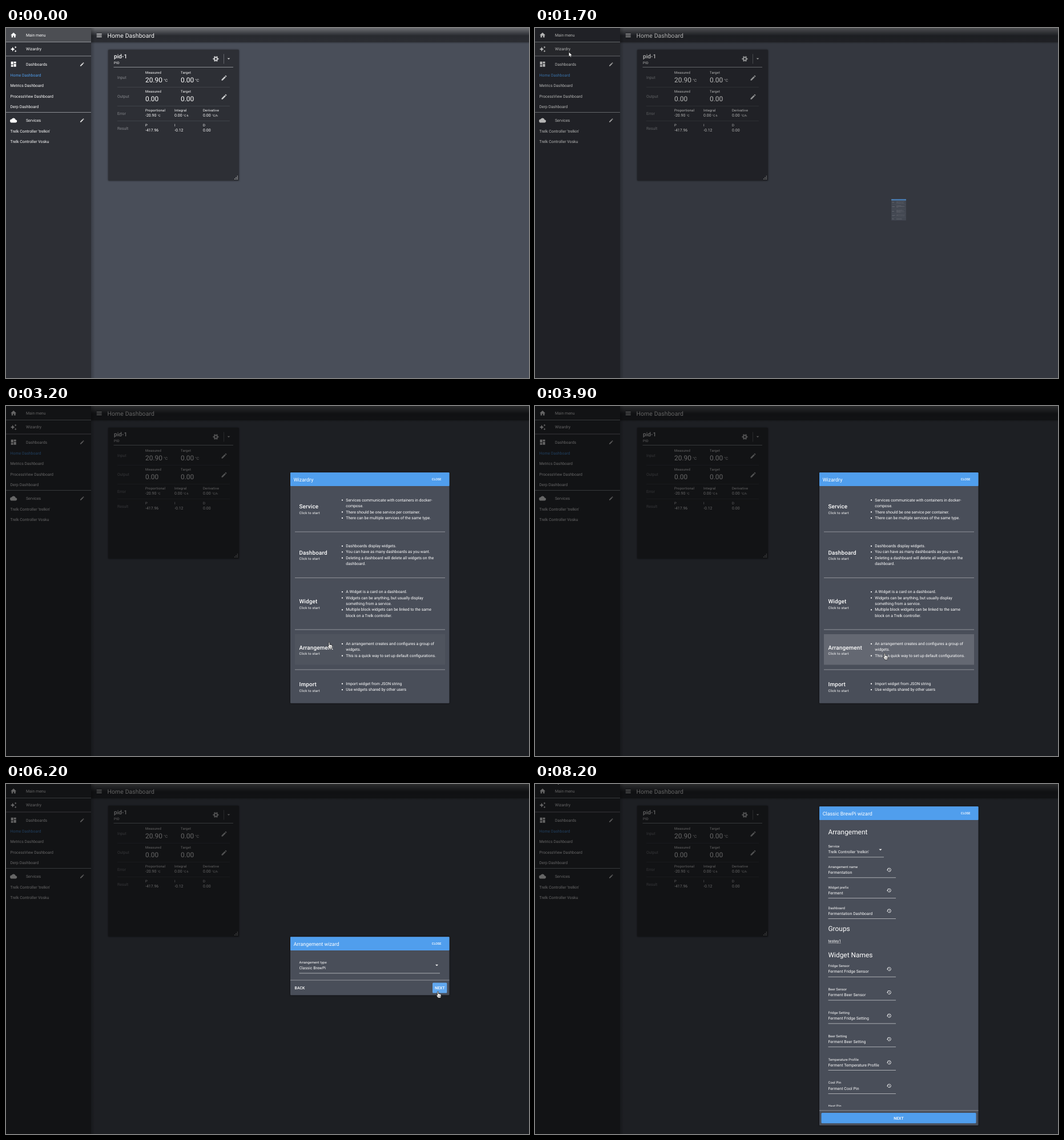
Animation of 916x612 px, one loop 8.7 s. Source, as an HTML page:

```html
<!DOCTYPE html>
<html lang="en">
<head>
<meta charset="utf-8">
<title>Dashboard wizard</title>
<style>
  html, body { margin: 0; width: 100%; height: 100%; overflow: hidden; background: #494e59; }
  svg { display: block; width: 916px; height: 612px; }
  text { font-family: Roboto, sans-serif; fill: #fff; text-rendering: geometricPrecision; white-space: pre; }
  .card { filter: drop-shadow(0 .5px 1.5px #0008); }
</style>
</head>
<body>
<svg id="stage" viewBox="0 0 916 612"></svg>
<script>
const PANEL = '#2d2f35', PAGE = '#494e59', BLUE = '#509eed', RULE = '#a4a6ab';
const SMALL = 5.96, BODY = 6.95, TITLE = 8.94, HEAD = 9.93, BIG = 11.92;

const ICONS = {
  home: 'M10 20v-6h4v6h5v-8h3L12 3 2 12h3v8z',
  sparkle: 'M19 9l1.25-2.75L23 5l-2.75-1.25L19 1l-1.25 2.75L15 5l2.75 1.25zM11.5 9.5L9 4 6.5 9.5 1 12l5.5 2.5L9 20l2.5-5.5L17 12zM19 15l-1.25 2.75L15 19l2.75 1.25L19 23l1.25-2.75L23 19l-2.75-1.25z',
  tiles: 'M3 13h8V3H3zm0 8h8v-6H3zm10 0h8V11h-8zm0-18v6h8V3z',
  cloud: 'M19.35 10A7.5 7.5 0 0 0 5.35 8 6 6 0 0 0 6 20h13a5 5 0 0 0 .35-10z',
  edit: 'M3 17.25V21h3.75L17.8 9.94l-3.75-3.75zM20.7 7a1 1 0 0 0 0-1.4l-2.3-2.3a1 1 0 0 0-1.4 0l-1.9 1.8 3.75 3.75z',
  menu: 'M3 18h18v-2H3zm0-5h18v-2H3zm0-7v2h18V6z',
  history: 'M13 3a9 9 0 0 0-9 9H1l3.9 3.9L9 12H6a7 7 0 1 1 2 4.9l-1.4 1.4A9 9 0 1 0 13 3zm-1 5v5l4.3 2.5.7-1.2-3.5-2.1V8z',
  caret: 'M7 10l5 5 5-5z'
};

// All text is placed by the vertical centre of its capitals.
const text = (x, mid, size, str, attrs = '') =>
  `<text x="${x}" y="${mid + size * .355}" font-size="${size}" ${attrs}>${str}</text>`;
const caption = (x, mid, str, attrs = '') => text(x, mid, SMALL, str, 'letter-spacing=".2" ' + attrs);
const medium = (x, mid, size, str, attrs = '') => text(x, mid, size, str, 'font-weight="500" ' + attrs);
const heading = (x, mid, str) => medium(x, mid, HEAD, str, 'letter-spacing=".12"');
const rect = (x, y, w, h, fill, attrs = '') =>
  `<rect x="${x}" y="${y}" width="${w}" height="${h}" fill="${fill}" ${attrs}/>`;
const rule = (x1, x2, y, color = RULE) => rect(x1, y - .4, x2 - x1, .8, color);
const icon = (name, x, y, size = BIG, fill = '#fff') =>
  `<path d="${ICONS[name]}" fill="${fill}" transform="translate(${x - size / 2} ${y - size / 2}) scale(${size / 24})"/>`;
const group = (id, body, attrs = '') => `<g id="${id}" ${attrs}>${body}</g>`;

function sidebar() {
  const link = (y, str, fill = '#fff') => text(7.5, y, BODY, str, `fill="${fill}" style="fill:${fill}"`);
  const section = (y, name, str, x = 35) => icon(name, 13.2, y) + text(x, y, BODY, str);
  return rect(0, 0, 149, 612, PANEL) +
    rect(0, 0, 149, 24.5, '#fff', 'id="hoverMenu"') + rect(0, 25, 149, 24, '#fff', 'id="hoverWizardry"') +
    section(12.5, 'home', 'Main menu') + rule(0, 149, 24.5) +
    section(37, 'sparkle', 'Wizardry') + rule(0, 149, 49) +
    section(63.3, 'tiles', 'Dashboards') + icon('edit', 133.3, 63.5, 8.9, '#ddd') +
    link(82.5, 'Home Dashboard', BLUE) + link(101, 'Metrics Dashboard') +
    link(119.3, 'ProcessView Dashboard') + link(138, 'Derp Dashboard') + rule(0, 149, 147.5) +
    section(161.5, 'cloud', 'Services') + icon('edit', 133.3, 161.5, 8.9, '#ddd') +
    link(180.7, "Trelk Controller 'trelkin'") + link(199, 'Trelk Controller Vosku');
}

function toolbar() {
  return rect(149, 0, 767, 25, PANEL) + rect(149, 0, 767, 25, 'url(#gloss)') +
    rect(149, 25, 767, 3, 'url(#below)') + rect(149, 0, 7, 612, 'url(#beside)') +
    icon('menu', 163.2, 13) + text(177.5, 13, 10.43, 'Home Dashboard', 'letter-spacing=".1"');
}

function pidWidget() {
  const label = (y, str) => text(195, y, BODY, str, 'style="fill:#85878c"');
  const value = (x, y, name, num, unit = '', unitX = 0) =>
    caption(x, y - 12, name) + text(x, y, BIG, num) + text(unitX, y + 1.5, 6.6, unit);
  const detail = (x, y, name, num, unit = '', unitX = 0) =>
    caption(x, y, name) + text(x, y + 8.8, BODY, num) + text(unitX, y + 9.2, 5, unit);
  const gear = `<g transform="translate(367.5 54)" fill="none" stroke="#c9cacc">
    <circle r="2.75" stroke-width="2.1"/>
    <circle r="4.3" stroke-width="1.5" pathLength="12" stroke-dasharray="1" stroke-dashoffset=".5"/></g>`;
  let grip = '';
  for (let row = 0; row < 3; row++)
    for (let col = 2 - row; col < 3; col++)
      grip += rect(400 + col * 2.4, 258.6 + row * 2.4, 1.2, 1.2, '#ddd');
  return rect(179, 38, 229, 229, PANEL, 'rx="1.5" class="card"') +
    heading(189, 49.5, 'pid-1') + caption(189, 60.8, 'PID') + gear +
    rect(381.2, 45.5, .7, 17, '#7d7f84') + icon('caret', 390, 53.7, 11, '#ddd') + rule(188.5, 398, 68.5) +
    label(86.5, 'Input') + value(244, 90.3, 'Measured', '20.90', '°C', 276.3) +
    value(306, 90.3, 'Target', '0.00', '°C', 331.3) + icon('edit', 382, 87.3, BIG, '#c9cacc') +
    rule(195, 392, 103.5, '#45474d') +
    label(119.5, 'Output') + value(244, 123.3, 'Measured', '0.00') +
    value(306, 123.3, 'Target', '0.00') + icon('edit', 382, 120.3, BIG, '#c9cacc') +
    rule(195, 392, 136.5, '#45474d') +
    label(149.8, 'Error') + detail(244, 144.2, 'Proportional', '-20.90', '°C', 265.5) +
    detail(295, 144.2, 'Integral', '0.00', '°C·h', 310.3) +
    detail(345, 144.2, 'Derivative', '0.00', '°C/h', 360.8) +
    rule(195, 392, 162.5, '#45474d') +
    label(175.8, 'Result') + detail(244, 170, 'P', '-417.96') +
    detail(295, 170, 'I', '-0.12') + detail(345, 170, 'D', '0.00') + grip;
}

const dialog = (top, bottom, title) =>
  rect(498, top, 278.5, bottom - top, PAGE, 'rx="1.5" class="card"') +
  rect(498, top, 278.5, 23.8, BLUE, 'rx="1"') +
  text(503.7, top + 12.2, TITLE, title) + medium(745.8, top + 11.6, 5.5, 'CLOSE');

const field = (y, name, value, right = 632) =>
  text(513.5, y, SMALL, name, 'letter-spacing=".06"') +
  text(513.5, y + 10, BODY, value, 'letter-spacing=".06"') + rule(513.5, right, y + 19.2, '#c3c5c9');

function wizardMenu() {
  const entry = (name, mid, listTop, lines) => heading(513.5, mid, name) + caption(513.5, mid + 11.2, 'Click to start') +
    lines.map((line, i) => {
      const y = listTop + i * 10.43, starts = line[0] === '*';
      return (starts ? `<circle cx="589" cy="${y + .4}" r="1.15" fill="#fff"/>` : '') +
        text(595.3, y, BODY, line.slice(starts ? 1 : 0));
    }).join('');
  return dialog(116.3, 519.7, 'Wizardry') + rect(506, 399, 263, 53.5, '#fff', 'id="hoverEntry"') +
    [220, 300.3, 391, 461].map(y => rule(506, 769, y)).join('') +
    entry('Service', 175.5, 164.2, ['*Services communicate with containers in docker-', 'compose.',
      '*There should be one service per container.', '*There can be multiple services of the same type.']) +
    entry('Dashboard', 256, 244.5, ['*Dashboards display widgets.', '*You can have as many dashboards as you want.',
      '*Deleting a dashboard will delete all widgets on the', 'dashboard.']) +
    entry('Widget', 341.7, 324.7, ['*A Widget is a card on a dashboard.', '*Widgets can be anything, but usually display',
      'something from a service.', '*Multiple block widgets can be linked to the same', 'block on a Trelk controller.']) +
    entry('Arrangement', 422, 415.5, ['*An arrangement creates and configures a group of', 'widgets.',
      '*This is a quick way to set up default configurations.']) +
    entry('Import', 486.2, 485.3, ['*Import widget from JSON string', '*Use widgets shared by other users']);
}

function typePicker() {
  return dialog(267.2, 369.2, 'Arrangement wizard') +
    field(311.7, 'Arrangement type', 'Classic BrewPi', 760) + icon('caret', 754.5, 316.8) +
    rule(498, 776.5, 343) + medium(505.5, 356.5, BODY, 'BACK') +
    rect(747, 347.5, 25.3, 18, BLUE, 'rx="1.5"') +
    rect(747, 347.5, 25.3, 18, '#fff', 'rx="1.5" id="hoverNext"') + medium(751, 356.5, BODY, 'NEXT');
}

function arrangementForm() {
  const section = (y, str) => text(513.5, y, BIG, str);
  const editable = (y, name, value) => field(y, name, value) + icon('history', 620, y + 5.5, 8.9);
  const parts = ['Fridge Sensor', 'Beer Sensor', 'Fridge Setting', 'Beer Setting', 'Temperature Profile', 'Cool Pin', 'Heat Pin'];
  return dialog(39.2, 597, 'Classic BrewPi wizard') +
    '<g clip-path="url(#formArea)">' + section(83.5, 'Arrangement') +
    field(108.7, 'Service', "Trelk Controller 'trelkin'", 611) + icon('caret', 605, 114.8) +
    editable(144.6, 'Arrangement name', 'Fermentation') + editable(180.5, 'Widget prefix', 'Ferment') +
    editable(216.4, 'Dashboard', 'Fermentation Dashboard') +
    section(252.5, 'Groups') + text(513.5, 274.3, BODY, 'testey1') + rule(513.5, 536, 278.2) +
    section(298.7, 'Widget Names') +
    parts.map((name, i) => editable(318 + i * 40.85, name, 'Ferment ' + name)).join('') + '</g>' +
    rule(498, 776.5, 571) + rect(501.5, 575, 271, 18.2, BLUE, 'rx="1.5"') +
    medium(637, 584.3, BODY, 'NEXT', 'text-anchor="middle"');
}

const gradient = (id, direction, stops) => `<linearGradient id="${id}" x2="${direction[0]}" y2="${direction[1]}">` +
  stops.map(([at, color, alpha]) => `<stop offset="${at}" stop-color="${color}" stop-opacity="${alpha}"/>`).join('') +
  '</linearGradient>';

document.getElementById('stage').innerHTML = '<defs>' +
  gradient('gloss', [0, 1], [[0, '#fff', .3], [.5, '#fff', 0], [.51, '#000', .12], [1, '#000', .04]]) +
  gradient('below', [0, 1], [[0, '#000', .22], [1, '#000', 0]]) +
  gradient('beside', [1, 0], [[0, '#000', .22], [1, '#000', 0]]) +
  // Long values end where the input does, and the list scrolls under the footer.
  '<clipPath id="formArea"><path d="M498 63H777V564H498zM602.5 486V496H612V486z" clip-rule="evenodd"/></clipPath></defs>' +
  rect(0, 0, 916, 612, PAGE) + toolbar() + sidebar() + pidWidget() +
  rect(0, 0, 916, 612, '#000', 'id="backdrop"') +
  group('menu', wizardMenu()) + group('picker', typePicker()) + group('form', arrangementForm()) +
  group('arrow', '<path d="M0 0V8l1.8-1.6 1.2 2.7 1.4-.6-1.2-2.6H5.8z" fill="#fff" stroke="#111" stroke-width=".5"/>') +
  group('hand', `<path d="M-1 0Q-1-1.2 0-1.2T1 0V3.2Q2 2.4 2.7 3.4 3.7 2.8 4.2 3.8 5.4 3.4 5.5 4.8V7.2
    Q5.3 8.7 4.6 10.3H.2Q-1.2 8-2.6 6.1-2.9 4.7-1 5.6z" fill="#eee" stroke="#111" stroke-width=".7"/>
    <path d="M1.2 6.2V8.5M2.7 6.2V8.5M4 6.2V8.5" stroke="#333" stroke-width=".5"/>`);

// [start ms, pointer x, pointer y, pointer shape, changed settings]
const steps = [
  [0, 0, 0, '', { hoverMenu: .15 }],
  [600, 44, 9, 'hand', {}],
  [700, 52, 25, 'hand', { hoverMenu: .1, hoverWizardry: .05 }],
  [800, 58, 38, 'hand', { hoverMenu: .04, hoverWizardry: .11 }],
  [900, 60, 42, 'hand', { hoverMenu: 0, hoverWizardry: .15 }],
  [1600, 60, 42, 'hand', { backdrop: .1, hoverWizardry: .13 }],
  [1700, 59.3, 42, 'arrow', { backdrop: .29, hoverWizardry: .04, dialog: 'menu', scale: .093, fade: .7 }],
  [1800, 59.3, 42, 'arrow', { backdrop: .5, hoverWizardry: 0, scale: .72, fade: .9 }],
  [1900, 59.3, 42, 'arrow', { backdrop: .6, scale: 1, fade: 1 }],
  [2400, 83, 69, 'arrow', {}],
  [3200, 566, 414.3, 'hand', { hoverEntry: .03 }],
  [3500, 592, 432.5, 'hand', { hoverEntry: .15 }],
  [3900, 612.5, 433.5, 'hand', {}],
  [4600, 612.3, 433.2, 'arrow', { dialog: 'picker' }],
  [5400, 668, 389, 'arrow', {}],
  [5700, 739, 372, 'arrow', {}],
  [6200, 756.5, 363.8, 'hand', { hoverNext: .1 }],
  [6900, 736, 360, 'arrow', { dialog: 'form' }],
  [7300, 597.5, 269.5, 'arrow', {}],
  [7700, 207.5, 80.5, 'arrow', {}],
  [8200, 37.5, -8, 'arrow', {}]
];

const LOOP = 8700;
const byId = id => document.getElementById(id);
const fades = ['hoverMenu', 'hoverWizardry', 'hoverEntry', 'hoverNext', 'backdrop'];

function render(time) {
  const past = steps.filter(step => step[0] <= time);
  const [, x, y, pointer] = past[past.length - 1];
  const state = Object.assign({}, ...past.map(step => step[4]));
  for (const id of fades) byId(id).setAttribute('opacity', state[id] || 0);
  for (const id of ['menu', 'picker', 'form']) byId(id).style.display = id === state.dialog ? '' : 'none';
  const menu = byId('menu');
  menu.setAttribute('transform', `translate(637 318) scale(${state.scale || 1}) translate(-637 -318)`);
  menu.setAttribute('opacity', state.fade || 1);
  for (const id of ['arrow', 'hand']) {
    byId(id).style.display = id === pointer ? '' : 'none';
    byId(id).setAttribute('transform', `translate(${x} ${y})`);
  }
}

const start = performance.now();
function tick() {
  render((performance.now() - start) % LOOP);
  requestAnimationFrame(tick);
}
tick();
</script>
</body>
</html>
```
